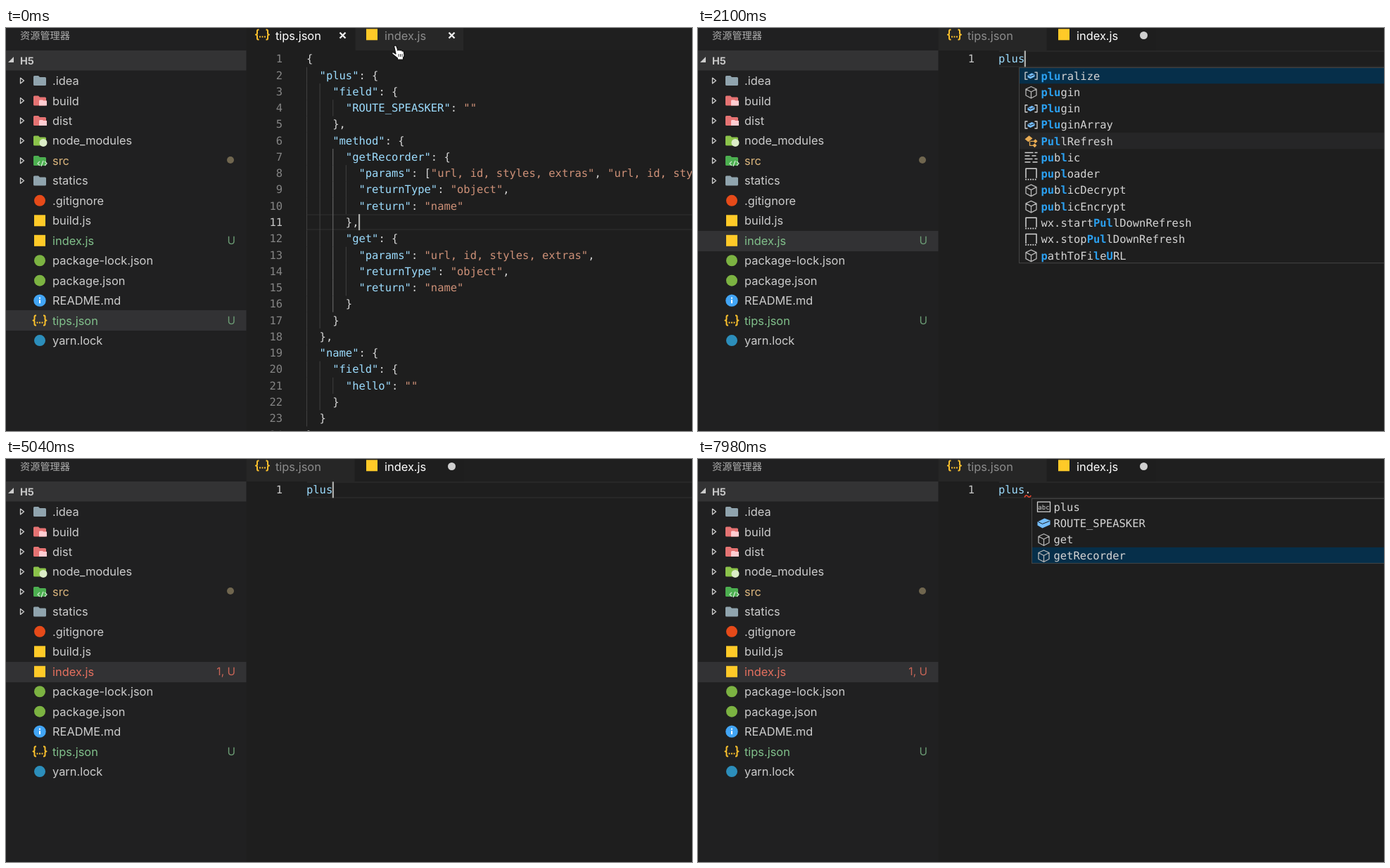
An HTML page with a canvas for the animation above (8 s loop, 975x574 px).

```html
<!DOCTYPE html>
<html lang="zh">
<head>
<meta charset="utf-8">
<title>Editor autocomplete</title>
<style>
  html, body { margin: 0; width: 100%; height: 100%; overflow: hidden; background: #1e1e1e; }
  canvas { display: block; }
</style>
</head>
<body>
<canvas id="stage" width="975" height="574"></canvas>
<script>
const ctx = document.getElementById('stage').getContext('2d');
ctx.textRendering = 'geometricPrecision'; // fractional glyph advances
const LOOP = 8000, TICK = 60;
const UI = '16.4px Inter, sans-serif';
const MONO = '15.46px "DejaVu Sans Mono", monospace';
const CHAR = 9.307, LINE = 23.27, CODE_X = 427, TOP = 32.4;
const ROW = 28.46;
const GREEN = '#81c08b', RED = '#e5705f', YELLOW = '#ffca28', TEXT = '#d4d4d4';

const FILES = [
  ['.idea', 'folder', '#90a4ae'],
  ['build', 'folder', '#e57373', '#ffcdd2'],
  ['dist', 'folder', '#e57373', '#ffcdd2'],
  ['node_modules', 'folder', '#8bc34a', '#dcedc8'],
  ['src', 'folder', '#4caf50', '#c8e6c9'],
  ['statics', 'folder', '#90a4ae'],
  ['.gitignore', 'disc', '#e64a19'],
  ['build.js', 'square', YELLOW],
  ['index.js', 'square', YELLOW],
  ['package-lock.json', 'disc', '#7cb342'],
  ['package.json', 'disc', '#7cb342'],
  ['README.md', 'info', '#42a5f5'],
  ['tips.json', 'braces', '#fbc02d'],
  ['yarn.lock', 'disc', '#2c8ebb'],
];

const JSON_LINES = `{
  "plus": {
    "field": {
      "ROUTE_SPEASKER": ""
    },
    "method": {
      "getRecorder": {
        "params": ["url, id, styles, extras", "url, id, styles, extras"],
        "returnType": "object",
        "return": "name"
      },
      "get": {
        "params": "url, id, styles, extras",
        "returnType": "object",
        "return": "name"
      }
    }
  },
  "name": {
    "field": {
      "hello": ""
    }
  }
}`.split('\n');

// Text between asterisks is the highlighted part of a match.
const MATCHES = [
  ['variable', '*plu*ralize'], ['method', '*plu*gin'], ['variable', '*Plu*gin'],
  ['variable', '*Plu*ginArray'], ['class', '*Pul*lRefresh'], ['keyword', '*pu*b*l*ic'],
  ['snippet', '*pu*p*l*oader'], ['method', '*pu*b*l*icDecrypt'], ['method', '*pu*b*l*icEncrypt'],
  ['snippet', 'wx.start*Pul*lDownRefresh'], ['snippet', 'wx.stop*Pul*lDownRefresh'],
  ['method', '*p*athToFi*l*e*U*RL'],
];
const NARROWED = [
  ['word', '*plus*'], ['variable', '*plu*gin*s*'], ['variable', '*Plu*gin*S*tore'], ['method', 'ap*pl*y*U*ser*S*tyle'],
];
const MEMBERS = [['word', 'plus'], ['field', 'ROUTE_SPEASKER'], ['method', 'get'], ['method', 'getRecorder']];

const between = (t, ...spans) => spans.some(([a, b]) => t >= a && t < b);
// Latest value whose start time has passed.
const at = (t, steps) => steps.filter(s => s[0] <= t).pop()[1];

function rect(x, y, w, h, color) {
  ctx.fillStyle = color;
  ctx.fillRect(x, y, w, h);
}
function disc(x, y, r, color) {
  ctx.fillStyle = color;
  ctx.beginPath();
  ctx.arc(x, y, r, 0, 7);
  ctx.fill();
}
function text(s, x, y, color, font = UI, align = 'left') {
  ctx.font = font;
  ctx.fillStyle = color;
  ctx.textAlign = align;
  ctx.fillText(s, x, y);
}
// SVG path drawn around (x, y).
function shape(d, x, y, fill, stroke, width = 1.2) {
  const path = new Path2D(d);
  ctx.save();
  ctx.translate(x, y);
  ctx.lineWidth = width;
  ctx.lineJoin = 'round';
  if (fill) { ctx.fillStyle = fill; ctx.fill(path); }
  if (stroke) { ctx.strokeStyle = stroke; ctx.stroke(path); }
  ctx.restore();
}

const fileIcons = {
  folder(x, y, color, mark, name) {
    shape('M-9-5.5Q-9-7-7.5-7H-2L0-5H7.5Q9-5 9-3.5V5.5Q9 7 7.5 7H-7.5Q-9 7-9 5.5Z', x, y, color);
    if (name === 'src') shape('M0 1L-3 4L0 7M7 1L10 4L7 7M5 0L2 8', x, y, null, mark, 1.4);
    else if (name === 'node_modules') disc(x + 5, y + 3, 5.5, mark);
    else if (mark) shape('M0-1H4L5 0H10V7H-1V0Z', x, y, mark);
  },
  disc(x, y, color) { disc(x, y, 8, color); },
  square(x, y, color) { rect(x - 8, y - 8, 16, 16, color); },
  info(x, y, color) {
    disc(x, y, 8.7, color);
    rect(x - 1, y - 1, 2, 5, '#fff');
    rect(x - 1, y - 4.5, 2, 2, '#fff');
  },
  braces(x, y, color) {
    const half = 'M-5-7H-6Q-7.5-7-7.5-5V-2Q-7.5 0-9.5 0Q-7.5 0-7.5 2V5Q-7.5 7-6 7H-5';
    shape(half, x, y, null, color, 2);
    ctx.save();
    ctx.translate(2 * x, 0);
    ctx.scale(-1, 1);
    shape(half, x, y, null, color, 2);
    ctx.restore();
    for (const dx of [-3.5, 0, 3.5]) rect(x + dx - 1, y + 2, 2, 2, color);
  },
};

const CUBE = 'M0-8L7.5-4.5V4.5L0 8.5L-7.5 4.5V-4.5ZM-7.5-4.5L0-.5L7.5-4.5M0-.5V8.5';
const symbolIcons = {
  method(x, y) { shape(CUBE, x, y, null, '#b8b8b8', 1.3); },
  variable(x, y) {
    shape('M-5-5H-8.5V5H-5M5-5H8.5V5H5', x, y, null, TEXT, 1.3);
    shape('M-5-1L1-4L5-2V1L-1 4L-5 2Z', x, y, '#75beff');
    shape('M-4-1L-1 .5L4-1.5', x, y, null, '#1e1e1e', 1);
  },
  field(x, y) {
    shape('M-9-2L1-7L9-4V2L-2 7L-9 3Z', x, y, '#75beff');
    shape('M-8-2L-2 1L8-3', x, y, null, '#1e1e1e', 1);
  },
  class(x, y) {
    shape('M-9-3L-3-8L2-4L-4 1ZM3 0L6-3L9 0L6 3ZM2 6L5 3L8 6L5 9Z', x, y, '#e8ab53');
    shape('M-2 0V6H3M-1 0H4', x, y, null, '#e8ab53', 1.3);
  },
  keyword(x, y) {
    shape('M-9-7H3M5-7H9M-9-2.5H-2M1-2.5H7M-9 2H2M5 2H9M-9 6.5H-1M2 6.5H9', x, y, null, TEXT, 1.6);
  },
  snippet(x, y) {
    shape('M-7.5 6V-7.5H7.5V6', x, y, null, TEXT, 1.5);
    for (let i = -7.5; i < 8; i += 3.4) rect(x + i - 0.8, y + 7, 1.8, 1.8, TEXT);
  },
  word(x, y) {
    shape('M-9-7H9V7H-9Z', x, y, null, TEXT, 1.3);
    text('abc', x, y + 3.5, TEXT, '9px "DejaVu Sans Mono", monospace', 'center');
  },
};

function drawSidebar(active, hasError) {
  rect(0, 0, 341.5, 574, '#202021');
  text('资源管理器', 20, 16, '#b0b0b0', '14.2px "Noto Sans CJK SC", "Noto Sans CJK", sans-serif');
  rect(0, 32, 341.5, 28.5, '#333334');
  shape('M3 49H11V41Z', 0, 0, '#ccc');
  text('H5', 20, 52, '#c8c8c8', 'bold 14.5px Inter, sans-serif');

  FILES.forEach(([name, icon, color, mark], i) => {
    const y = 75.1 + i * ROW;
    const broken = name === 'index.js' && hasError;
    const untracked = name === 'index.js' || name === 'tips.json';
    if (name === active) rect(0, Math.round(y - ROW / 2), 341.5, 29, '#323234');
    if (icon === 'folder') shape('M-2-4V4L3 0Z', 22.5, y, null, '#d0d0d0', 1.3);
    fileIcons[icon](48, y, color, mark, name);
    const label = broken ? RED : untracked ? GREEN : name === 'src' ? '#d9b47c' : '#cccccc';
    text(name, 66, y + 6, label);
    if (untracked) text(broken ? '1, U' : 'U', 326, y + 5.3, broken ? '#c96557' : '#6c9d75', '15.5px Inter, sans-serif', 'right');
    if (name === 'src') disc(319, y - 1, 5, '#70664f');
  });
}

function drawTabs(active, dirty) {
  const onTips = active === 'tips.json';
  const cross = x => shape('M-4-4L4 4M4-4L-4 4', x, 10.5, null, '#f0f0f0', 2.4);
  rect(341.5, 0, 633.5, 32, '#1f1f1f');
  if (onTips) rect(496.5, 0, 153.5, 32, '#272727');
  else rect(341.5, 0, 154, 32, '#262626');
  rect(onTips ? 341.5 : 496, 0, 154.5, 32, '#1e1e1e');
  fileIcons.braces(364.5, 9.5, '#fbc02d');
  text('tips.json', 383, 17, onTips ? '#fff' : '#8c8c8c');
  fileIcons.square(520, 9.3, YELLOW);
  text('index.js', 538, 17, onTips ? '#8c8c8c' : '#fff');
  if (onTips) cross(478.5);
  if (dirty) disc(633.5, 10.5, 5.5, '#cfcfcf');
  else cross(633.5);
}

const baseline = row => TOP + row * LINE + 16.9;

function drawLineNumber(row, active) {
  text(row + 1, 393, baseline(row), active ? '#c6c6c6' : '#858585', MONO, 'right');
}
function drawCurrentLine(row) {
  for (const edge of [0, LINE - 2]) rect(428, Math.round(TOP + row * LINE + edge), 547, 2, '#272727');
}
function drawCaret(row, column) {
  rect(CODE_X + column * CHAR - 0.5, TOP + row * LINE, 2.2, 23, '#aeafad');
}

function drawJson() {
  drawCurrentLine(10);
  JSON_LINES.forEach((line, row) => {
    drawLineNumber(row, row === 10);
    const depth = line.search(/\S/) / 2;
    for (let d = 0; d < depth; d++) {
      const lit = d === 2 && row > 5 && row < 16;
      rect(CODE_X + d * 2 * CHAR, TOP + row * LINE, 1, LINE, lit ? '#707070' : '#404040');
    }
    for (const m of line.matchAll(/"[^"]*"|[^"\s]+/g)) {
      const isKey = line[m.index + m[0].length] === ':';
      const color = m[0][0] !== '"' ? TEXT : isKey ? '#9cdcfe' : '#ce9178';
      text(m[0], CODE_X + m.index * CHAR, baseline(row), color, MONO);
    }
  });
  drawCaret(10, 8);
}

function drawScript(typed, caretOn, squiggle) {
  drawCurrentLine(0);
  drawLineNumber(0, true);
  text(typed.slice(0, 4), CODE_X, baseline(0), '#9cdcfe', MONO);
  text(typed.slice(4), CODE_X + 4 * CHAR, baseline(0), TEXT, MONO);
  if (squiggle) shape('M0 1.5Q2.4-3 4.7 0T9.3-1', 464, 53, null, '#e0452f', 1.6);
  if (caretOn) drawCaret(0, typed.length);
}

function drawPopup(x, rows, selected, hovered) {
  const top = 56, h = rows.length * LINE;
  rect(x, top, 975 - x, h, '#1e1e1e');
  rows.forEach(([icon, label], i) => {
    const y = top + i * LINE;
    if (i === selected) rect(x, y, 975 - x, LINE, '#062f4a');
    else if (i === hovered) rect(x, y, 975 - x, LINE, '#262627');
    symbolIcons[icon](x + 17.5, y + 12.2);
    let column = 0;
    label.split('*').forEach((part, k) => {
      text(part, x + 31.5 + column * CHAR, y + 17.6, k % 2 ? '#2ba0f0' : TEXT, (k % 2 ? 'bold ' : '') + MONO);
      column += part.length;
    });
  });
  ctx.strokeStyle = '#454545';
  ctx.lineWidth = 1;
  ctx.strokeRect(x + 0.5, top + 0.5, 990 - x, h - 1);
}

function drawPointer(t) {
  const p = Math.min(1, Math.max(0, (t - 240) / 600));
  const ease = p * p * (3 - 2 * p);
  const x = 553 + 10 * ease, y = 26 + 144 * ease;
  if (y < 32) {
    shape('M-1.5 0Q0-2 2 0L4 6Q6 4 7 6Q9 4.5 10 7Q12 6 12.5 8.5L13 13Q13 15 11.5 16V19H3.5V17L-4 11Q-5 8-2 9L1 11Z', x, y, '#fff', '#111', 1.2);
    shape('M5 11V15M7.5 11V15M10 11V15', x, y, null, '#333', 1);
  } else {
    const beam = 'M-4-10Q0-10 0-7Q0-10 4-10M0-7V7M-4 10Q0 10 0 7Q0 10 4 10M-2 3H2';
    shape(beam, x, y, null, '#111', 3.5);
    shape(beam, x, y, null, '#fff', 1.7);
  }
}

function draw(now) {
  const t = Math.floor(now % LOOP / TICK) * TICK;
  const active = t < 120 ? 'tips.json' : 'index.js';
  const typed = at(t, [[0, ''], [1500, 'p'], [1680, 'pl'], [1920, 'plu'], [2100, 'plus'],
    [3180, 'plus.'], [4740, 'plus'], [5580, 'plus.']]);
  const hasError = between(t, [3600, 5280], [6060, LOOP]);
  const caretOn = !between(t, [600, 1020], [2400, 2880], [3660, 4080], [4560, 4740],
    [5280, 5580], [6060, 6480], [6960, 7440], [7920, LOOP]);

  rect(0, 0, 975, 574, '#1e1e1e');
  if (active === 'tips.json') drawJson();
  else drawScript(typed, caretOn, hasError && typed.endsWith('.'));
  drawTabs(active, t >= 1500);
  drawSidebar(active, hasError);

  if (between(t, [1920, 2160])) drawPopup(456, MATCHES, 0, 4);
  if (between(t, [2160, 2820])) drawPopup(465, NARROWED, 0);
  if (between(t, [3240, 4740])) drawPopup(474, MEMBERS.slice(0, 1), 0);
  if (t >= 5640) drawPopup(474, MEMBERS, at(t, [[0, 0], [7020, 1], [7380, 2], [7560, 3]]));
  if (t < 1500) drawPointer(t);
}

function frame() {
  draw(performance.now());
  requestAnimationFrame(frame);
}
frame();
</script>
</body>
</html>
```
